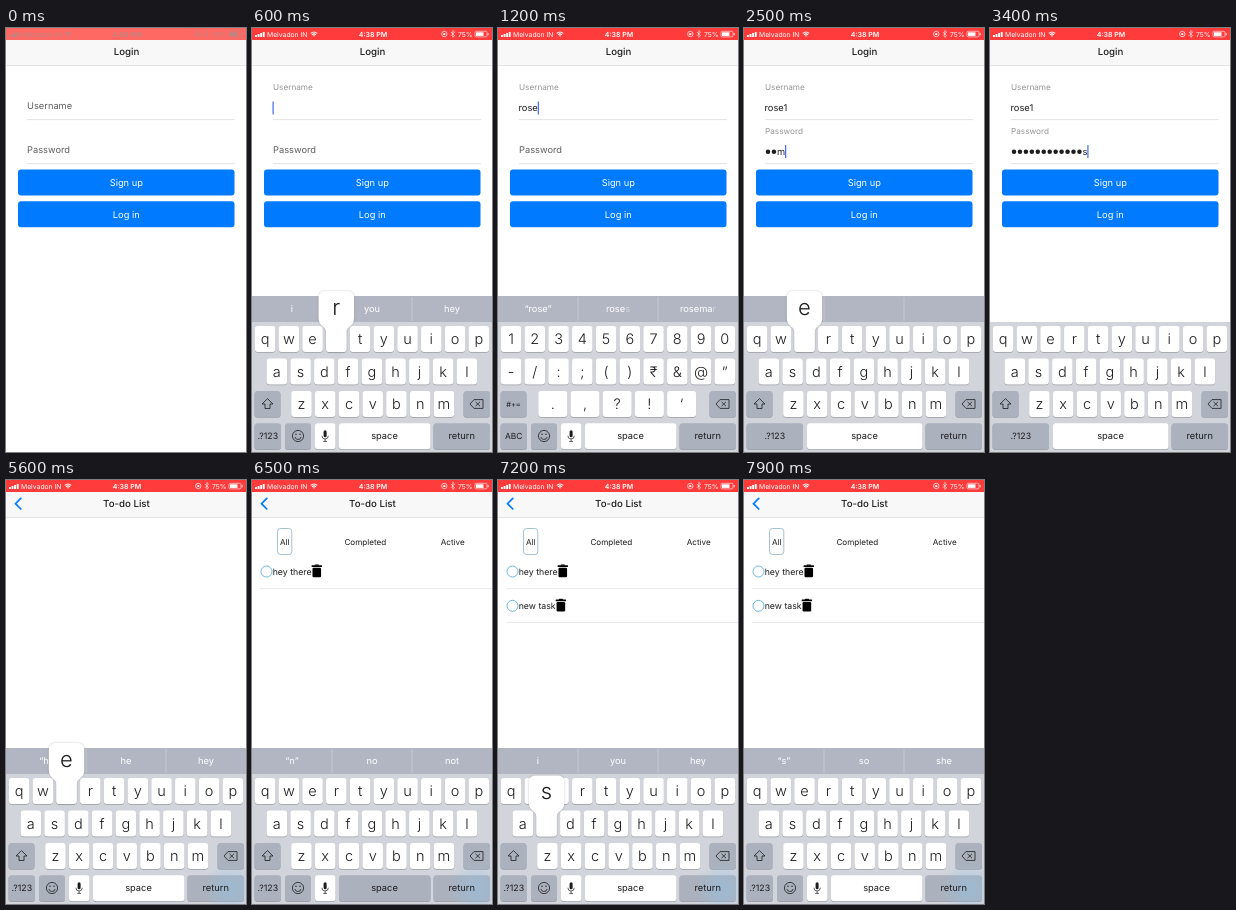
Write an HTML page with a canvas that moves like this. It is 240 px wide and 424 px high and loops after 8000 ms.

```html
<!DOCTYPE html>
<html lang="en">
<head>
<meta charset="utf-8">
<title>To-do app</title>
<style>
html, body { margin: 0; height: 100%; overflow: hidden; background: #fff; }
canvas { display: block; width: 240px; height: 424px; }
</style>
</head>
<body>
<canvas id="stage"></canvas>
<script>
const W = 240, H = 424, LOOP = 8000;
const BLUE = '#007aff', GREY_KEY = '#abb1bd', INK = '#1c1c1e';
const canvas = document.getElementById('stage');
const dpr = window.devicePixelRatio || 1;
canvas.width = W * dpr;
canvas.height = H * dpr;
const c = canvas.getContext('2d');
c.textRendering = 'geometricPrecision';

// Each run: the keys pressed one after another, when they start, and the pace.
const runs = {
  name: { start: 550, step: 100, keys: 'rose' },
  digit: { start: 1300, step: 100, keys: '1' },
  secret: { start: 2230, step: 90, keys: 'homesandtrees' },
  first: { start: 4800, step: 100, keys: 'hey there\n' },
  second: { start: 6200, step: 100, keys: 'new task' },
  submit: { start: 7100, step: 100, keys: '\n' },
  third: { start: 7200, step: 100, keys: 'set lis' }
};
const KEYBOARD_HIDDEN = 158;

// Word predictions; the part after "|" is dimmed.
const predictions = [
  [0, 'i', 'you', 'hey'],
  [650, '“r”', 'rather', 'really'],
  [950, '“rose”', 'rose|s', 'rosema|r'],
  [1400, '“rose1”', '', ''],
  [1750, '', '', ''],
  [4000, 'i', 'you', 'hey'],
  [4900, '“h”', 'he', 'hey'],
  [5800, 'i', 'you', 'hey'],
  [6250, '“n”', 'no', 'not'],
  [7150, 'i', 'you', 'hey'],
  [7300, '“s”', 'so', 'she']
];

const ramp = (t, from, to) => {
  const p = Math.min(1, Math.max(0, (t - from) / (to - from)));
  return p * p * (3 - 2 * p);
};
const mix = (a, b, p) => a + (b - a) * p;
const typed = (t, run) => run.keys.slice(0, Math.max(0, Math.floor((t - run.start) / run.step)));
const pressedKey = t => {
  for (const run of Object.values(runs)) {
    const key = run.keys[Math.floor((t - run.start) / run.step)];
    if (key) return key;
  }
};

function text(s, x, y, size, color = INK, align = 'left', weight = 400) {
  c.font = `${weight} ${size}px Inter, sans-serif`;
  c.textAlign = align;
  c.textBaseline = 'alphabetic';
  c.fillStyle = color;
  c.fillText(s, x, y + size * 0.36);
  return c.measureText(s).width;
}
function rect(x, y, w, h, color) {
  c.fillStyle = color;
  c.fillRect(x, y, w, h);
}
function round(x, y, w, h, r, color) {
  c.beginPath();
  c.roundRect(x, y, w, h, r);
  c.fillStyle = color;
  c.fill();
}
function line(color, width, ...points) {
  c.beginPath();
  for (let i = 0; i < points.length; i += 2) c.lineTo(points[i], points[i + 1]);
  c.strokeStyle = color;
  c.lineWidth = width;
  c.stroke();
}
function ring(x, y, r, color, width, from = 0, to = 7) {
  c.beginPath();
  c.arc(x, y, r, from, to);
  c.strokeStyle = color;
  c.lineWidth = width;
  c.stroke();
}
function dot(x, y, r, color) {
  c.beginPath();
  c.arc(x, y, r, 0, 7);
  c.fillStyle = color;
  c.fill();
}

function statusBar(t) {
  const waking = t < 100;
  const ink = waking ? '#b98783' : '#fff';
  rect(0, 0, W, 12, waking ? '#ff6963' : '#ff3b3b');
  for (let i = 0; i < 4; i++) rect(3 + i * 2.6, 7 - i, 1.9, 2 + i, ink);
  text('Melvadon IN', 15, 6.2, 6.8, ink);
  for (const r of [1.2, 3, 4.8]) ring(62, 9, r, ink, 1.1, -2.3, -0.84);
  text('4:38 PM', 121, 6.2, 7, ink, 'center', 600);
  ring(192.3, 6, 2.7, ink, 0.7);
  rect(191.3, 5.2, 2, 1.8, ink);
  line(ink, 0.6, 199, 4, 202.6, 7.8, 200.8, 9.4, 200.8, 2.4, 202.6, 4, 199, 7.8);
  text('75%', 220.5, 6.2, 6.8, ink, 'right');
  c.beginPath();
  c.roundRect(223, 3.3, 12, 5.6, 1.3);
  c.strokeStyle = ink;
  c.lineWidth = 0.6;
  c.stroke();
  rect(224, 4.3, 7.5, 3.6, ink);
  rect(235.7, 5, 0.9, 2.2, ink);
}

function header(title) {
  rect(0, 0, W, H, '#fff');
  rect(0, 12, W, 25, '#f8f8f9');
  rect(0, 37, W, 0.6, '#d2d2d4');
  text(title, 120.5, 23.4, 9.7, INK, 'center', 500);
}

function field(label, y, lift) {
  const shade = mix(95, 150, lift);
  text(label, 21, mix(y - 13.5, y - 32.5, lift), mix(9.3, 8.2, lift), `rgb(${shade},${shade},${shade})`);
  rect(21, y, 208, 0.8, '#dcdce0');
}
const caret = (x, y) => rect(x, y - 6.5, 1.2, 13, '#426bf2');

function button(label, y, pressed) {
  c.globalAlpha = pressed ? 0.4 : 1;
  round(12, y, 216.5, 26, 3, BLUE);
  text(label, 120.3, y + 13, 9.3, '#fff', 'center');
  c.globalAlpha = 1;
}

function loginScreen(t) {
  header('Login');
  field('Username', 91.3, ramp(t, 180, 380));
  field('Password', 135.3, ramp(t, 1850, 2050));
  const nameWidth = text(typed(t, runs.name) + typed(t, runs.digit), 20.5, 80, 9.3);
  const secret = typed(t, runs.secret);
  const hidden = Math.max(0, secret.length - 1);
  for (let i = 0; i < hidden; i++) dot(24 + i * 5.95, 123.7, 2.25, INK);
  const x = 21 + hidden * 5.95;
  const letterWidth = text(secret.slice(-1), x, 124, 9.3);
  if (t > 180 && t < 1850) caret(20.5 + nameWidth, 80);
  if (t >= 1850 && t < 3850) caret(x + letterWidth, 123.5);
  button('Sign up', 141.5);
  button('Log in', 173.2, t >= 3750 && t < 3900);
}

function task(label, y) {
  ring(14.5, y, 5.5, '#4ba5d3', 0.8);
  const x = 20.7 + text(label, 20.7, y, 8.75);
  round(x, y - 6.2, 10.4, 1.7, 0.5, '#000');
  rect(x + 3.2, y - 7, 4, 1.2, '#000');
  round(x + 0.9, y - 3.8, 8.6, 9.5, 1.2, '#000');
  rect(8, y + 16.5, W, 0.6, '#dedee2');
}

function todoScreen(t) {
  header('To-do List');
  c.lineCap = 'round';
  line(BLUE, 1.7, 14.8, 18.4, 9.5, 23.7, 14.8, 29);
  c.lineCap = 'butt';
  if (t < 5800) return;
  c.beginPath();
  c.roundRect(25.5, 48.5, 14.3, 26, 3);
  c.strokeStyle = '#7fa6c2';
  c.lineWidth = 0.7;
  c.stroke();
  text('All', 32.7, 61.7, 8.1, INK, 'center');
  text('Completed', 113.3, 61.7, 8.1, INK, 'center');
  text('Active', 200.7, 61.7, 8.1, INK, 'center');
  task('hey there', 91.5);
  if (t >= 7150) task('new task', 125.8);
}

function key(label, x, y, w, color = '#fff', size = 14.5, weight = 400) {
  round(x, y + 0.7, w, 26, 3, '#9a9da5');
  round(x, y, w, 26, 3, color);
  if (label) text(label, x + w / 2, y + 12.8, size, INK, 'center', weight);
}

function popup(label, x, y) {
  c.beginPath();
  c.moveTo(x, y + 6);
  c.bezierCurveTo(x, y, x - 7.5, y + 1, x - 7.5, y - 8);
  c.arcTo(x - 7.5, y - 35, x, y - 35, 6);
  c.arcTo(x + 28, y - 35, x + 28, y - 8, 6);
  c.lineTo(x + 28, y - 8);
  c.bezierCurveTo(x + 28, y + 1, x + 20.5, y, x + 20.5, y + 6);
  c.arcTo(x + 20.5, y + 26, x + 10, y + 26, 3);
  c.arcTo(x, y + 26, x, y + 6, 3);
  c.closePath();
  c.shadowColor = 'rgba(0,0,0,.25)';
  c.shadowBlur = 2;
  c.fillStyle = '#fff';
  c.fill();
  c.shadowColor = 'transparent';
  text(label, x + 10.2, y - 19, 22, INK, 'center', 300);
}

function predictionBar(t) {
  rect(0, 268, W, 26, '#b1b6c2');
  const words = predictions.filter(p => p[0] <= t).pop().slice(1);
  words.forEach((word, i) => {
    const [solid, dim = ''] = word.split('|');
    c.font = '400 9.3px Inter, sans-serif';
    const x = 40 + i * 80 - c.measureText(solid + dim).width / 2;
    const w = text(solid, x, 280.5, 9.3, '#fff');
    text(dim, x + w, 280.5, 9.3, 'rgba(255,255,255,.45)');
    if (i) rect(i * 80 - 0.4, 269, 0.8, 24, '#c8ccd4');
  });
}

function keyIcons(numeric, secure) {
  if (!numeric) {
    line(INK, 0.8, 15.5, 370.6, 21, 376, 18, 376, 18, 380.5, 13, 380.5, 13, 376, 10, 376, 15.5, 370.6);
  }
  line(INK, 0.8, 218, 376, 222, 371.6, 231, 371.6, 231, 380.4, 222, 380.4, 218, 376);
  line(INK, 0.8, 223.5, 373.8, 228, 378.2);
  line(INK, 0.8, 228, 373.8, 223.5, 378.2);
  if (secure) return;
  ring(46, 408, 5.6, INK, 0.8);
  dot(44, 406.3, 0.7, INK);
  dot(48, 406.3, 0.7, INK);
  ring(46, 408.3, 3.2, INK, 0.8, 0.2, Math.PI - 0.2);
  round(71.6, 402.3, 3, 7, 1.5, INK);
  ring(73.1, 407.8, 3.2, INK, 0.7, 0, Math.PI);
  line(INK, 0.7, 73.1, 411, 73.1, 413.4);
  line(INK, 0.7, 71.2, 413.4, 75, 413.4);
}

function keyboard(t) {
  const numeric = t >= 1000 && t < 1750;
  const secure = t >= 1750 && t < 4050;
  const barHidden = t >= 2700 && t < 4050;
  const pressed = pressedKey(t);
  let bubble;
  const row = (chars, x, y, w = 20.5, pitch = 23.75) => [...chars].forEach((ch, i) => {
    key(ch, x + i * pitch, y, w, '#fff', 14.5, 300);
    if (ch === pressed) bubble = [ch, x + i * pitch, y];
  });

  rect(0, barHidden ? 294 : 268, W, 160, '#d1d4db');
  if (!barHidden) predictionBar(t);
  if (numeric) {
    row('1234567890', 2.8, 298);
    row('-/:;()₹&@”', 2.8, 330.5);
    row('.,?!‘', 40.3, 363, 29, 32.2);
  } else {
    row('qwertyuiop', 2.8, 298);
    row('asdfghjkl', 14.6, 330.5);
    row('zxcvbnm', 39.2, 363);
  }
  key(numeric ? '#+=' : '', 2.5, 363, 26, GREY_KEY, 7.5);
  key('', 211.5, 363, 26.5, GREY_KEY);
  key(numeric ? 'ABC' : '.?123', 2.5, 395.3, secure ? 56.5 : 26.5, GREY_KEY, numeric ? 8.4 : 8.8);
  if (!secure) {
    key('', 33, 395.3, 26, GREY_KEY);
    key('', 63, 395.3, 20.5);
  }
  const spaceX = secure ? 63 : 87;
  key('', spaceX, 395.3, 178.5 - spaceX, pressed === ' ' ? GREY_KEY : '#fff');
  text('space', secure ? 120.5 : 132.5, 407.8, 9.3, INK, 'center');
  key('', 181.5, 395.3, 56.5, pressed === '\n' ? '#fff' : GREY_KEY);
  if (t >= 4050) {
    const glow = c.createRadialGradient(224, 409, 6, 224, 409, 27);
    glow.addColorStop(0, 'rgba(145,195,232,.42)');
    glow.addColorStop(1, 'rgba(145,195,232,0)');
    rect(190, 382, 50, 42, glow);
  }
  text('return', 209.7, 407.8, 9.3, INK, 'center');
  keyIcons(numeric, secure);
  if (bubble) popup(...bubble);
}

function draw(t) {
  c.setTransform(dpr, 0, 0, dpr, 0, 0);
  const push = ramp(t, 3900, 4130);
  if (push < 1) {
    c.save();
    c.translate(-72 * push, 0);
    loginScreen(t);
    c.restore();
  }
  if (push > 0) {
    c.save();
    c.translate(W * (1 - push), 0);
    todoScreen(t);
    c.restore();
  }
  const shown = t < 4050 ? ramp(t, 200, 450) - ramp(t, 3850, 4040) : ramp(t, 4090, 4290);
  if (shown > 0) {
    c.save();
    c.translate(0, KEYBOARD_HIDDEN * (1 - shown));
    keyboard(t);
    c.restore();
  }
  statusBar(t);
}

function frame() {
  draw(performance.now() % LOOP);
  requestAnimationFrame(frame);
}
frame();
</script>
</body>
</html>
```
